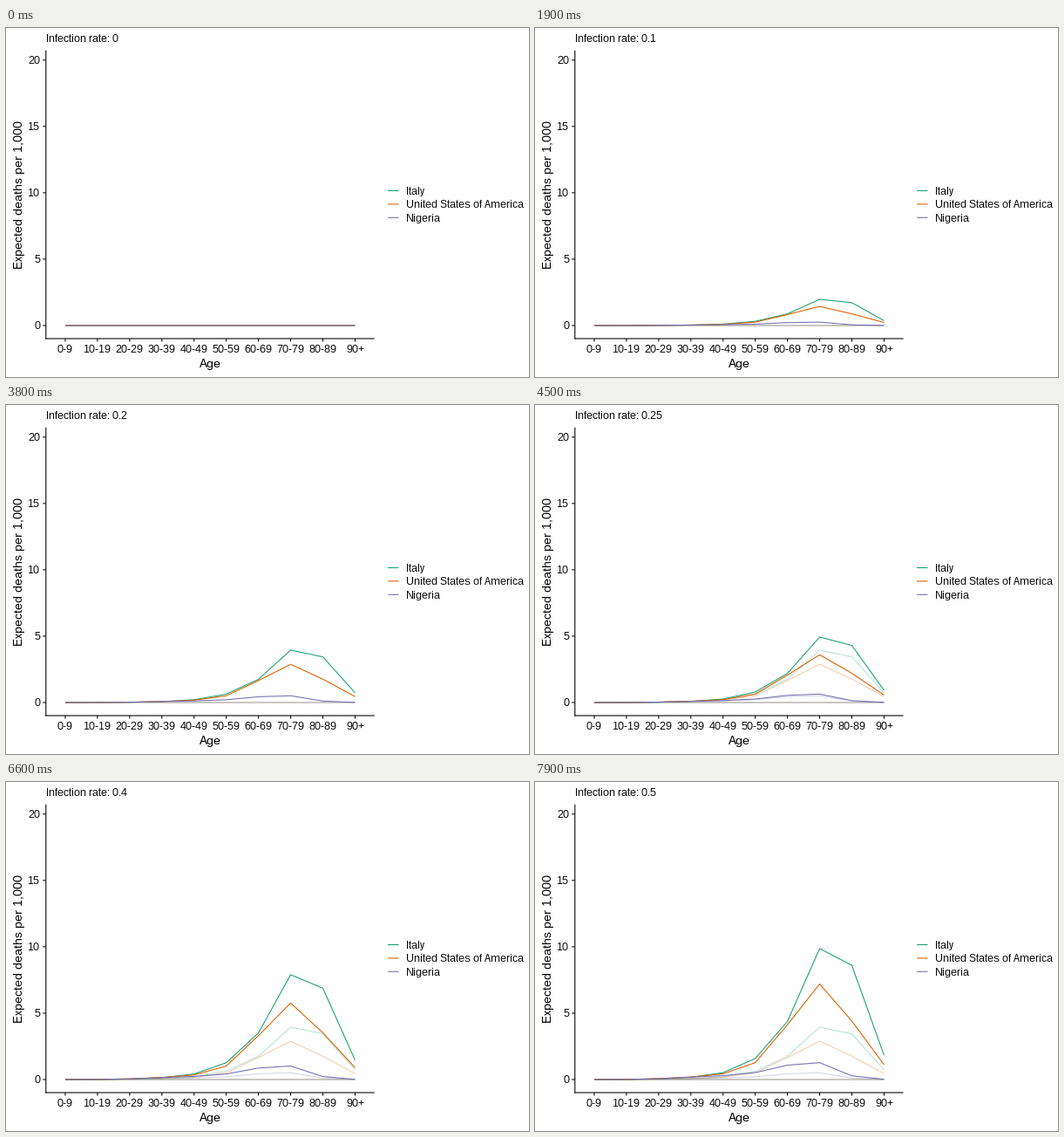
Write a matplotlib script that moves like this. It is 600 by 400 pixels and loops after 8000 ms.

```python
import numpy as np
import matplotlib.pyplot as plt
from matplotlib.animation import FuncAnimation

plt.rcParams["font.family"] = "Liberation Sans"
# whole-pixel glyph advances without kerning
plt.rcParams["text.hinting"] = "default"
plt.rcParams["text.hinting_factor"] = 1
plt.rcParams["text.kerning_factor"] = 6

W, H, DPI = 600, 400, 100
PX = 72 / DPI                    # one pixel in points
FRAMES, INTERVAL = 80, 100
LINE = 1.07 * PX

LEFT, RIGHT, TOP, BOTTOM = 45.8, 422.6, 25.7, 356.0
X_STEP = (RIGHT - LEFT) / 10.2
X0 = LEFT + 0.6 * X_STEP
Y_MAX = 19.74
Y_UNIT = (BOTTOM - TOP) / (1.1 * Y_MAX)
Y0 = BOTTOM - 0.05 * Y_MAX * Y_UNIT
TICK = 3.5

AGES = [f"{a}-{a + 9}" for a in range(0, 90, 10)] + ["90+"]

# deaths per 1,000 at an infection rate of 0.5
COUNTRIES = [
    ("Italy", "#1b9e77",
     [0, 0.005, 0.05, 0.17, 0.52, 1.58, 4.38, 9.87, 8.6, 1.83]),
    ("United States of America", "#d95f02",
     [0, 0.005, 0.07, 0.19, 0.43, 1.27, 4.13, 7.2, 4.4, 1.12]),
    ("Nigeria", "#7570b3",
     [0, 0.01, 0.06, 0.18, 0.29, 0.52, 1.08, 1.27, 0.28, 0.02]),
]

STEP = 0.05
FIRST_MOVE, HOLD = 8, 4
MARKED = (0, 4)                  # states that leave a pale trace


def moves():
    """Start frame and length of each move to the next state."""
    start = FIRST_MOVE
    for state in range(10):
        length = 4 if state < 3 else 3
        yield start, length
        start += length + HOLD


MOVES = list(moves())


def progress(i):
    """Position along the states, in states, at frame i."""
    return sum(min(max((i - s + 1) / n, 0), 1) for s, n in MOVES)


def curve_y(deaths, rate):
    return Y0 - Y_UNIT * np.array(deaths) * rate / 0.5


fig = plt.figure(figsize=(W / DPI, H / DPI), dpi=DPI, facecolor="white")
ax = fig.add_axes([0, 0, 1, 1])
ax.set_xlim(0, W)
ax.set_ylim(H, 0)
ax.axis("off")


def label(x, y, s, size=12, ha="left", va="baseline", **kw):
    return ax.text(x, y, s, fontsize=size * PX, ha=ha, va=va,
                   color="black", **kw)


def stroke(x, y, color="black", **kw):
    return ax.plot(x, y, color=color, lw=LINE, snap=False,
                   solid_capstyle="butt", solid_joinstyle="round", **kw)[0]


xs = X0 + X_STEP * np.arange(len(AGES))

stroke([LEFT, LEFT], [TOP, BOTTOM + 0.5])
stroke([LEFT - 0.5, RIGHT], [BOTTOM, BOTTOM])
for x, age in zip(xs, AGES):
    stroke([x, x], [BOTTOM, BOTTOM + TICK])
    label(x, 372, age, ha="center")
for value in range(0, 21, 5):
    y = Y0 - Y_UNIT * value
    stroke([LEFT - TICK, LEFT], [y, y])
    label(39.2, y + 4.4, str(value), ha="right")

label((LEFT + RIGHT) / 2, 389, "Age", 14, "center")
label(22.3, 191.3, "Expected deaths per 1,000", 14, "right", "center",
      rotation=90)
title = label(LEFT, 16, "")

for row, (name, color, _) in enumerate(COUNTRIES):
    y = 186.5 + 15.4 * row
    stroke([438.1, 450.5], [y, y], color)
    label(459, y + 4.5, name)

traces = {
    state: [stroke(xs, curve_y(d, state * STEP), c, alpha=0.3, zorder=3)
            for _, c, d in COUNTRIES]
    for state in MARKED
}
lines = [stroke(xs, curve_y(d, 0), c, zorder=4) for _, c, d in COUNTRIES]


def draw(i):
    pos = progress(i)
    for line, (_, _, deaths) in zip(lines, COUNTRIES):
        line.set_ydata(curve_y(deaths, pos * STEP))
    for state, group in traces.items():
        for line in group:
            line.set_visible(pos > state + 1e-6)
    nearest = int(np.floor(pos + 0.499))
    title.set_text(f"Infection rate: {nearest * STEP:.3g}")
    return lines + [title]


anim = FuncAnimation(fig, draw, frames=FRAMES, interval=INTERVAL,
                     init_func=lambda: draw(0), repeat=True, repeat_delay=0)
plt.show()
```
